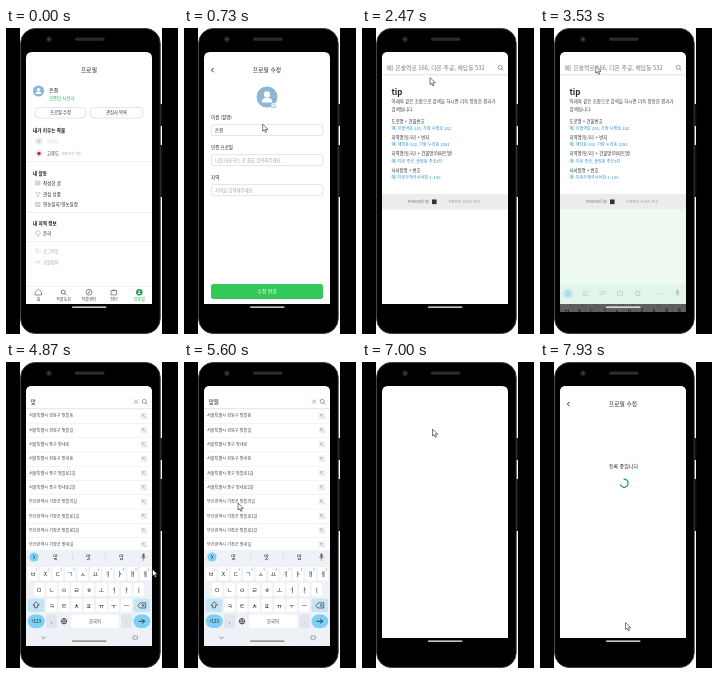
These frames come from a looping animation (172x306 px, 8000 ms). An HTML page:

```html
<!DOCTYPE html>
<html lang="ko">
<head>
<meta charset="utf-8">
<style>
html, body { margin: 0; width: 100%; height: 100%; overflow: hidden; background: #000; }
svg { display: block; width: 100vw; height: 100vh; }
text { font-family: 'Noto Sans CJK KR', 'Noto Sans CJK', 'Noto Sans', sans-serif; white-space: pre; }
</style>
</head>
<body>
<svg id="stage" viewBox="0 0 172 306"></svg>
<script>
const LOOP = 8000;
const GREEN = '#34c759', GREY = '#999', BLUE = '#2f8fc4', SKY = '#8db5d5';

// Drawing helpers; text is placed by its vertical centre.
const text = (x, y, s, size = 4.5, fill = '#222', more = '') =>
  `<text x="${x}" y="${y + size * .36}" font-size="${size}" fill="${fill}" ${more}>${s}</text>`;
const mid = 'text-anchor="middle"', bold = 'font-weight="700"', medium = 'font-weight="500"';
const rect = (x, y, w, h, fill, r = 0, more = '') =>
  `<rect x="${x}" y="${y}" width="${w}" height="${h}" rx="${r}" fill="${fill}" ${more}/>`;
const circle = (x, y, r, fill, more = '') => `<circle cx="${x}" cy="${y}" r="${r}" fill="${fill}" ${more}/>`;
const path = (d, stroke = '#333', w = .6, fill = 'none') =>
  `<path d="${d}" stroke="${stroke}" stroke-width="${w}" fill="${fill}" stroke-linecap="round" stroke-linejoin="round"/>`;
const group = (id, body) => `<g id="${id}">${body}</g>`;
const box = (x, y, w, h, r = 2) => rect(x, y, w, h, '#fff', r, 'stroke="#d2d2d2" stroke-width=".6"');
const blank = rect(20, 24, 126, 252, '#fff');

const avatar = (x, y, r) => circle(x, y, r, SKY) + circle(x, y - r * .25, r * .3, '#fff') +
  path(`M${x - r * .5} ${y + r * .52}q0 ${-r * .44} ${r * .5} ${-r * .44}t${r * .5} ${r * .44}z`, 'none', 0, '#fff');
const magnifier = (x, y, c = '#777') => circle(x, y, 2, 'none', `stroke="${c}" stroke-width=".7"`) +
  path(`M${x + 1.5} ${y + 1.5}l1.4 1.4`, c, .7);
const cross = (x, y) => path(`M${x - 1.8} ${y - 1.8}l3.6 3.6m0-3.6l-3.6 3.6`, '#777', .6);
const pin = (x, y, c) => path(`M${x} ${y + 2.4}c-4-4-2-5 0-5s4 1 0 5z`, c, .5);

function profile() {
  const pageIcon = (y) => path(`M30 ${y - 2}h4v4h-4zm1 1.4h2m-2 1.2h2`, '#888', .45);
  const rule = y => rect(20, y, 126, .8, '#eeeeee');
  const tab = (i, s) => text(32.5 + i * 25.2, 271.5, s, 4, i == 4 ? '#1c9b50' : '#444', mid + medium.padStart(18));
  return blank + text(83, 41.5, '프로필', 5.8, '#222', `${mid} ${medium}`) +
    avatar(32.5, 63, 5.6) + text(43, 62, '온결', 5) + text(43, 70, '인증된 사용자', 4.4, '#31b463') +
    box(29, 79.5, 51, 10.5, 4) + box(84, 79.5, 53, 10.5, 4) +
    text(54.5, 84.8, '프로필 수정', 4.3, '#333', mid) + text(110.5, 84.8, '관심사 목록', 4.3, '#333', mid) +
    text(27, 102.5, '내가 키우는 작물', 4.6, '#111', bold) +
    circle(33, 113, 3.8, '#e9eef4') + circle(33, 113, 1.6, '#c4cedc') + text(41, 113, '토마토', 4.2, '#d3d3d3') +
    circle(33, 125.3, 3.8, '#f1eeee') + circle(33, 125.6, 1.8, '#c92b35') + text(41, 125.3, '고추도', 4.4) +
    text(56, 125.5, '재배 중인 작물', 3.1, '#aaa') + rule(133) +
    text(27, 145, '내 활동', 4.6, '#111', bold) +
    pageIcon(155) + text(37, 155, '작성한 글') +
    path('M32 168.2c-4-3-2-5 0-3.2c2-1.8 4 .2 0 3.2z', '#888', .45) + text(37, 166, '관심 상품') +
    pageIcon(176.5) + text(37, 176.5, '영농일지/영농일정') + rule(184) +
    text(27, 195.5, '내 지역 정보', 4.6, '#111', bold) + pin(32, 205.5, '#888') + text(37, 205.5, '운리') + rule(213) +
    path('M32 221h-2v4h2m-.5-2h3', '#bbb', .45) + text(37, 223, '로그아웃', 4.3, '#aaa') +
    path('M30 233.5h4m-4 1.5h4', '#bbb', .45) + text(37, 234, '회원탈퇴', 4.3, '#aaa') +
    rect(20, 258, 126, .5, '#e2e2e2') +
    path('M29.5 264l3-2.8l3 2.8v3h-6z', '#444', .6) + magnifier(57.2, 264, '#444') +
    circle(83, 264.2, 2.9, 'none', 'stroke="#444" stroke-width=".6"') + path('M82 265.3l.6-1.6l1.5-.7l-.6 1.6z', '#444', .4) +
    path('M105.5 262.5h5v4.4h-5zm1.2 0q1.3-2.6 2.6 0', '#444', .6) +
    circle(133.3, 264.2, 3.2, '#1c9b50') + circle(133.3, 263.4, 1, '#fff') + rect(131.8, 265, 3, 1, '#fff', .5) +
    ['홈', '작물도감', '작물센터', '장터', '프로필'].map((s, i) => tab(i, s)).join('');
}

const header = path('M29.3 40.2l-1.9 1.9l1.9 1.9', '#111', .9) + text(83, 41.6, '프로필 수정', 5.8, '#222', `${mid} ${medium}`);

function edit() {
  const field = (y, label, value, c) => text(27, y, label, 4.5, '#222', medium) + box(27.3, y + 7.6, 111.5, 11) +
    text(31, y + 13, value, 4.4, c);
  return blank + header + avatar(83, 69, 10.5) +
    circle(90, 78, 3, '#fff') + path('M88 77h1l.5-.8h1l.5.8h1v2.6h-4z', '#999', .45) + circle(90, 78.4, .6, '#999') +
    field(89, '이름 (필명)', '온결', '#333') +
    field(119, '인증 프로필', '나를 대표하는 한 줄을 입력해주세요', '#a5a5a5') +
    field(149, '지역', '<tspan id="region"></tspan>', '#a5a5a5') +
    rect(27, 256, 112, 15, GREEN, 2.5) + text(83, 263.4, '수정 완료', 5, '#fff', `${mid} ${medium}`);
}

function tips() {
  const examples = [
    ['도로명 + 건물번호', '예) 은솔역로 235, 가람 나래로 242'],
    ['지역명(동/리) + 번지', '예) 해담동 532, 가람 누리동 2181'],
    ['지역명(동/리) + 건물명(아파트명)', '예) 다온 주공, 솔빛동 주공3차'],
    ['사서함명 + 번호', '예) 다온우체국사서함 1~100']];
  return blank + text(29.5, 64, 'tip', 8, '#222', bold) +
    text(29.5, 73.2, '아래와 같은 조합으로 검색을 하시면 더욱 정확한 결과가', 4.5, '#444') +
    text(29.5, 81, '검색됩니다.', 4.5, '#444') +
    examples.map(([a, b], i) => text(29.5, 93 + i * 16.4, a, 4.4, '#333') +
      text(29.5, 100.3 + i * 16.4, b, 4.1, BLUE)).join('') +
    rect(20, 166, 126, 15.5, '#ececec') + text(46, 173.8, 'Powered by', 3.8, '#777') + rect(70, 171.5, 4.6, 4.6, '#333') +
    text(86, 173.8, '우편번호 서비스 안내', 3.6, '#999');
}

function suggestions() {
  const places = ['서울특별시 성동구 맞들동', '서울특별시 성북구 맞들길', '서울특별시 중구 맞내로', '서울특별시 성동구 맞내동',
    '서울특별시 중구 맞들로1길', '서울특별시 중구 맞내로2길', '부산광역시 기장군 맞들리길', '부산광역시 기장군 맞들로1길',
    '부산광역시 기장군 맞들로2길', '부산광역시 기장군 맞내길'];
  return blank + places.map((p, i) => {
    const y = 54 + i * 14.3;
    return text(23, y, p, 4.15, '#444') + rect(20, y + 7, 126, .5, '#e9e9e9') + rect(134.5, y - 3.5, 7, 7, '#f4f4f4') +
      path(`M140 ${y + 2}l-3.6-3.6m0 2.5v-2.5h2.5`, '#999', .5);
  }).join('');
}

function results() {
  const row = (y, code, road, lot) => text(24, y, code, 4.6, '#e0483e', medium) +
    text(24, y + 9, '도로명', 3.4, BLUE) + text(37, y + 9, road, 4.4) +
    text(24, y + 17, '지번', 3.4, BLUE) + text(37, y + 17, lot, 4.4, '#666') + rect(20, y + 24, 126, .5, '#ddd');
  return rect(20, 47, 126, 229, '#ececec') + rect(20, 47, 126, 192, '#fff') +
    [0, 1, 2, 3, 4, 5].map(i => row(55 + i * 32, `0000${i + 1}`, `광주 서구 맞들로 ${i * 4 + 3}`, `광주 서구 맞들동 ${i + 11}`)).join('');
}

function keyboard() {
  const key = (x, y, s, hint = '') => rect(x - 5.3, y - 6.7, 10.6, 13.4, '#fff', 1.8) +
    text(x, y + .4, s, 6.2, '#222', mid) + (hint && text(x + 3.4, y - 4.3, hint, 2.8, '#777', mid));
  const row = (keys, x, y, numbered) => [...keys].map((s, i) => key(x + i * 12.45, y, s, numbered ? (i + 1) % 10 + '' : '')).join('');
  const tint = '#c5e4f5', accent = '#7dcff5';
  return rect(20, 188, 126, 96, '#eef1f5') + circle(28, 195, 4.6, accent) + path('M27.3 193.3l1.7 1.7l-1.7 1.7', '#234', .7) +
    group('words', ['맞', '맛', '맘'].map((s, i) => text(49.5 + i * 33, 195, s, 5.2, '#222', mid)).join('') +
      rect(66, 192, .5, 6, '#ccc') + rect(99, 192, .5, 6, '#ccc')) +
    group('tools', path('M43 193h5m-5 2h3m-3 2h5', '#777', .6) + text(62.5, 195, 'GIF', 4.3, '#777', mid) +
      rect(77.5, 192.8, 5, 4.4, 'none', .6, 'stroke="#777" stroke-width=".6"') + circle(98, 195, 2.2, 'none', 'stroke="#777" stroke-width=".9"') +
      [117, 119, 121].map(x => circle(x, 195, .5, '#777')).join('')) +
    rect(136.4, 191.4, 2.2, 4.6, '#666', 1.1) + path('M135.2 195q2.3 4 4.6 0m-2.3 2v1.4', '#666', .5) +
    row('ㅂㅈㄷㄱㅅㅛㅕㅑㅐㅔ', 27, 211.8, true) + row('ㅁㄴㅇㄹㅎㅗㅓㅏㅣ', 33.2, 227.6) + row('ㅋㅌㅊㅍㅠㅜㅡ', 45.6, 243.4) +
    rect(21.7, 236.7, 16.5, 13.4, tint, 1.8) + path('M30 240l-3 3.2h1.6v2.6h2.8v-2.6h1.6z', '#222', .6) +
    rect(127.5, 236.7, 16.7, 13.4, tint, 1.8) + path('M132 243.4l2.3-2.6h5.4v5.2h-5.4zm4.2-1.2l2 2.4m0-2.4l-2 2.4', '#222', .6) +
    rect(21.7, 252.6, 17, 13.4, accent, 6.7) + text(30.2, 259.3, '?123', 4.5, '#222', mid) +
    rect(40.3, 252.6, 10.6, 13.4, '#dfe5eb', 1.8) + text(45.6, 259.3, ',', 5, '#222', mid) +
    circle(58, 259.3, 2.7, 'none', 'stroke="#222" stroke-width=".7"') + path('M55.3 259.3h5.4m-2.7-2.7q-2.4 2.7 0 5.4q2.4-2.7 0-5.4', '#222', .5) +
    rect(65, 252.6, 48, 13.4, '#fff', 1.8) + text(89, 259.3, '한국어', 4.3, '#444', mid) +
    rect(115.2, 252.6, 10.6, 13.4, '#dfe5eb', 1.8) + text(120.5, 259.3, '.', 5, '#222', mid) +
    rect(127.5, 252.6, 16.7, 13.4, accent, 6.7) + path('M133 259.3h5.5m-2-2l2 2l-2 2', '#222', .8) +
    path('M35.8 275l1.7 1.7l1.7-1.7', '#555', .7) + rect(127, 274, 4.5, 3.2, 'none', .4, 'stroke="#555" stroke-width=".5"');
}

const phone = rect(14, 0, 142, 306, '#fff') + rect(153, 76, 3.5, 22, '#111', 1) + rect(153, 117, 3.5, 52, '#111', 1) +
  rect(14.6, .4, 139.6, 305.2, '#000', 15, 'stroke="#3a3a3a" stroke-width="1"') +
  rect(69, 9.6, 29.5, 3.2, '#2b2b2b', 1.6) + circle(43, 11.3, 2.7, '#1f242b') + circle(43, 11.3, 1.1, '#3b4654');

const searchBar = rect(20, 24, 126, 23, '#fff') + rect(20, 46.5, 126, .7, '#d6d6d6') +
  '<text id="query" x="24.5" y="42" font-size="5.8"></text>' + group('clear', cross(130, 39.6)) + magnifier(138.2, 39.4);

const stage = document.getElementById('stage');
stage.innerHTML = `<clipPath id="glass"><path d="M20 284V30q0-6 6-6h114q6 0 6 6v254z"/></clipPath>` + phone +
  `<g clip-path="url(#glass)">` +
  group('profile', profile()) + group('edit', edit()) + group('tips', tips()) + group('suggestions', suggestions()) +
  group('empty', rect(20, 47, 126, 229, '#ececec')) + group('results', results()) + group('search', searchBar) +
  group('blank', blank) +
  group('loading', blank + header + text(83.5, 104, '등록 중입니다', 5, '#222', `${mid} ${medium}`) +
    group('spinner', path('M84 117.2a4 4 0 1 1-3.6 5.6', '#159a98', 1.2))) +
  group('glow', rect(20, 181.5, 126, 94.5, '#eefaf1') + rect(20, 257, 126, 19, '#dcf6e5')) +
  group('keyboard', keyboard()) + '</g>' +
  '<rect id="home" x="66" y="278.4" width="34.5" height="1.3" rx=".6"/>' +
  group('pointer', path('M0 0v6.6l1.6-1.4l1.2 2.7l1.2-.6l-1.2-2.5h2.2z', '#222', .6, '#fff'));

const el = Object.fromEntries([...stage.querySelectorAll('[id]')].map(e => [e.id, e]));
const show = (name, on) => el[name].setAttribute('display', on ? 'inline' : 'none');
const clamp = v => Math.max(0, Math.min(1, v));
const smooth = v => v * v * (3 - 2 * v);
const ramp = (t, a, b) => clamp((t - a) / (b - a));

// Pointer stops: time, x, y.
const stops = [[100, 76, 130], [350, 60, 85], [560, 60, 85], [900, 97, 108], [1130, 62, 122], [1500, 57, 124], [1560, 57, 124],
  [1870, 64, 161], [2150, 64, 161], [2450, 68, 50], [2660, 68, 50], [2800, 61, 49], [3000, 61, 49], [3330, 55.5, 38.5],
  [3740, 56, 38.5], [3950, 34, 228], [4230, 120, 228], [4520, 39, 212], [4640, 39, 212], [4870, 146.5, 207.5], [5080, 52, 212],
  [5300, 119, 243], [5480, 70, 228], [5720, 38.5, 57], [6080, 38.5, 57.5], [6560, 60, 64], [6740, 70.5, 67.5], [7020, 70.5, 67.5],
  [7200, 80, 90], [7640, 85.5, 261], [8000, 85.5, 261]];

function pointerAt(t) {
  const i = Math.max(1, stops.findIndex(s => s[0] >= t));
  const [a, x, y] = stops[i - 1], [b, u, v] = stops[i], k = smooth(ramp(t, a, b));
  return [x + (u - x) * k, y + (v - y) * k];
}

const typed = [[3960, 'ㅁ'], [4260, '마'], [4560, '맞'], [5120, '맞ㄷ'], [5330, '맞드'], [5510, '맞들'], [5770, '광주광역시 서구 맞들로']];

function draw(t) {
  const query = typed.reduce((s, [at, v]) => t >= at ? v : s, '');
  const opened = ramp(t, 3470, 3730), closed = ramp(t, 5780, 5960);
  const searching = t >= 2330 && t < 6890;
  show('profile', t < 680);
  show('edit', (t >= 500 && t < 2200) || t >= 7130);
  el.edit.setAttribute('opacity', t < 2200 ? ramp(t, 500, 680) : 1);
  el.region.textContent = t < 5000 ? '지역을 입력해주세요' : '광주 서구 맞들로';
  el.region.setAttribute('fill', t < 5000 ? '#a5a5a5' : '#333');
  show('tips', searching && t < 4270);
  show('suggestions', t >= 4270 && t < 5780);
  show('empty', t >= 5780 && t < 6330);
  show('results', t >= 6330 && t < 6890);
  show('search', searching);
  el.query.textContent = query || '예) 은솔역로 166, 다온 주공, 해담동 532';
  el.query.setAttribute('fill', query ? '#222' : '#777');
  show('clear', query);
  show('blank', (t >= 2130 && t < 2330) || (t >= 6890 && t < 7130));
  show('loading', t >= 7730);
  el.spinner.setAttribute('transform', `rotate(${(t - 7930) * .36} 84 121.2)`);

  const typing = opened > 0 && closed < 1;
  show('keyboard', typing);
  show('glow', t >= 3490 && t < 3620);
  show('words', query);
  show('tools', !query);
  const drop = closed > 0 ? 96 * smooth(closed) : 92 * (1 - opened);
  el.keyboard.setAttribute('transform', `translate(0 ${drop})`);
  el.keyboard.setAttribute('opacity', closed > 0 ? 1 - closed * .5 : clamp(opened * 1.6));
  el.home.setAttribute('fill', opened > .6 && closed < .5 ? '#777' : '#fff');

  show('pointer', t >= 100);
  el.pointer.setAttribute('transform', `translate(${pointerAt(t)})`);
}

const start = performance.now();
function tick() {
  draw((performance.now() - start) % LOOP);
  requestAnimationFrame(tick);
}
tick();
</script>
</body>
</html>
```
